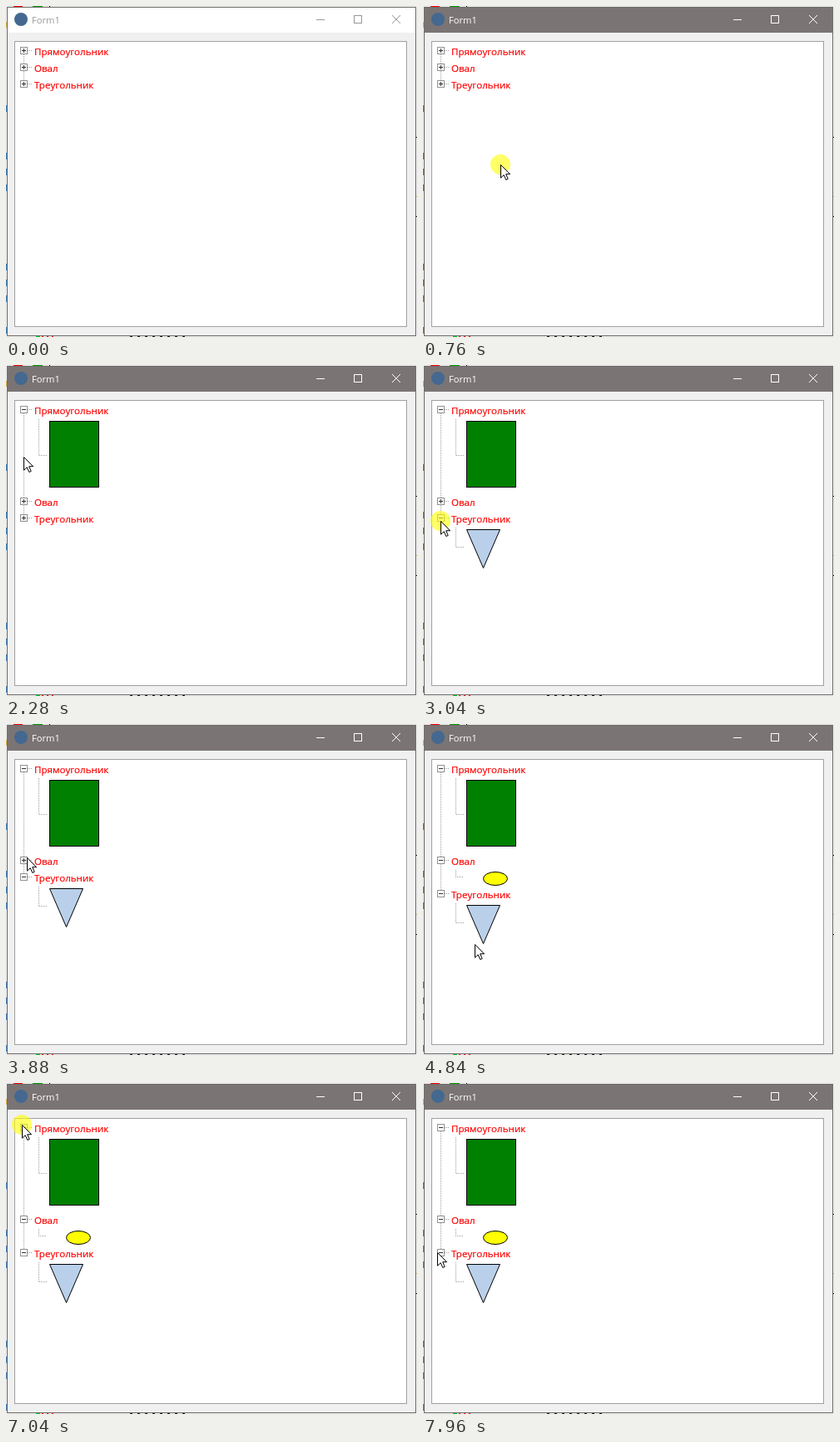
An HTML page for the animation above (8 s loop, 494 by 397 pixels).

```html
<!DOCTYPE html>
<html lang="ru">
<head>
<meta charset="utf-8">
<title>Form1</title>
<style>
  html, body { margin: 0; width: 100%; height: 100%; overflow: hidden; background: #f0f0f0; }
  svg { display: block; width: 494px; height: 397px; }
  text { font: 11.2px "Open Sans", "Noto Sans", sans-serif; }
  .crisp { shape-rendering: crispEdges; }
  .dots { stroke: #a0a0a0; stroke-dasharray: 1 1; fill: none; }
  .label { font-size: 11.6px; fill: #f00; stroke: #f00; stroke-width: .2; }
  .shape { stroke: #000; }
</style>
</head>
<body>
<svg viewBox="0 0 494 397">
  <rect width="494" height="397" fill="#f0f0f0"/>
  <g id="behind" class="crisp">
    <path d="M9 .5h11" stroke="#f00"/>
    <path d="M32 .5h12" stroke="#00a000"/>
    <path d="M52 .5h1M492 157.5h2M492 252.5h2" stroke="#000"/>
    <path d="M.5 19v7M492 228.5h2" stroke="#e0b050"/>
    <path d="M36 396h5" stroke="#00d020" stroke-width="2"/>
    <path d="M43 396.5h17" stroke="#f00" stroke-dasharray="2 4"/>
    <path d="M149 396.5h66" stroke="#222" stroke-dasharray="3 6"/>
  </g>
  <rect class="crisp" x="1" y="1" width="492" height="395" fill="#f0f0f0"/>
  <rect id="bar" class="crisp" x="1" y="1" width="492" height="31"/>
  <rect class="crisp" x="1.5" y="1.5" width="491" height="394" fill="none" stroke="#6e6a69"/>
  <circle cx="18" cy="16" r="8" fill="#44688f"/>
  <text id="caption" x="31" y="21">Form1</text>
  <g id="buttons" fill="none">
    <path class="crisp" d="M373 16.5h10M418.5 11.5h9v9h-9z"/>
    <path d="M464 11l10 10M474 11l-10 10"/>
  </g>
  <rect class="crisp" x="10.5" y="42.5" width="471" height="342" fill="#fff" stroke="#a0a0a0"/>
  <path id="trunk" class="dots crisp"/>
  <g id="tree"></g>
  <g id="pointer">
    <circle id="glow" r="12" fill="#ff0" fill-opacity=".6"/>
    <path d="M.5 .5V16.2L4.2 12.7L6.8 18.5L9.2 17.4L6.7 11.7H11.6Z" fill="#fff" stroke="#000"/>
  </g>
</svg>
<script>
const LOOP = 8000, TICK = 40, PRESS = 80;
const ACTIVATE = 760;
const ROW = 20;
const byId = id => document.getElementById(id);

function set(el, attrs) {
  for (const name in attrs) el.setAttribute(name, attrs[name]);
  return el;
}

function add(parent, tag, attrs, content = "") {
  const el = set(document.createElementNS("http://www.w3.org/2000/svg", tag), attrs);
  el.textContent = content;
  return parent.appendChild(el);
}

// icons of the window behind, one character per 19 px row
[..."#..###....###.#"].forEach((mark, row) => {
  if (mark === "#")
    add(byId("behind"), "rect", { x: 0, y: 119 + 19 * row, width: 2, height: 8, fill: "#3f7fbd" });
});

// toggles: times at which the node is opened, closed, opened...
const nodes = [
  { name: "Прямоугольник", toggles: [1760, 6320, 7040], height: 90,
    shape: ["path", { d: "M52.5 23.5h59v79h-59z", fill: "#008000", class: "shape crisp" }] },
  { name: "Овал", toggles: [4040], height: 20,
    shape: ["ellipse", { cx: 87, cy: 31.5, rx: 14.5, ry: 8, fill: "#ff0", class: "shape" }] },
  { name: "Треугольник", toggles: [3040], height: 50,
    shape: ["path", { d: "M52.5 23.5h40l-20 46z", fill: "#bad0ea", class: "shape" }] },
];

for (const node of nodes) {
  node.group = add(byId("tree"), "g", {});
  add(node.group, "path", { d: "M26 9.5H31", class: "dots crisp" });
  add(node.group, "path", { d: "M17.5 5.5h8v8h-8z", fill: "#fff", stroke: "#919191", class: "crisp" });
  node.sign = add(node.group, "path", { stroke: "#333", class: "crisp" });
  add(node.group, "text", { x: 34, y: 15, class: "label" }, node.name);
  node.child = add(node.group, "g", {});
  add(node.child, "path", { d: `M39.5 21V${node.height / 2 + 19.5}H49`, class: "dots crisp" });
  add(node.child, ...node.shape);
}

const clicks = [ACTIVATE, ...nodes.flatMap(node => node.toggles)];

// the pointer rests between moves
const APPEAR = 480;
const origin = { x: 127, y: 239 };
const moves = [
  { from: APPEAR, to: 600, x: 94, y: 193 },
  { from: 720, to: 1200, x: 24, y: 45 },
  { from: 1360, to: 1560, x: 21, y: 50 },
  { from: 1840, to: 2800, x: 21, y: 187 },
  { from: 3120, to: 3240, x: 17, y: 231 },
  { from: 3360, to: 3880, x: 25, y: 160 },
  { from: 4120, to: 4840, x: 62, y: 264 },
  { from: 4840, to: 5320, x: 26, y: 153 },
  { from: 5440, to: 6120, x: 21, y: 50 },
  { from: 6560, to: 7040, x: 19, y: 50 },
  { from: 7120, to: 7960, x: 17, y: 203 },
];

function ease(time, from, to) {
  const u = Math.min(1, Math.max(0, (time - from) / (to - from)));
  return u * u * (3 - 2 * u);
}

function pointerAt(time) {
  let { x, y } = origin;
  for (const move of moves) {
    const k = ease(time, move.from, move.to);
    x += (move.x - x) * k;
    y += (move.y - y) * k;
  }
  return [Math.round(x), Math.round(y)];
}

const visibility = shown => ({ visibility: shown ? "visible" : "hidden" });

function drawWindow(active) {
  const ink = active ? "#fff" : "#999";
  set(byId("bar"), { fill: active ? "#7a7574" : "#fff" });
  set(byId("caption"), { fill: ink });
  set(byId("buttons"), { stroke: ink });
}

function drawTree(time) {
  let y = 44, last = y;
  for (const node of nodes) {
    const open = node.toggles.filter(t => t <= time).length % 2 === 1;
    set(node.group, { transform: `translate(0 ${y})` });
    set(node.sign, { d: open ? "M19 9.5h5" : "M19 9.5h5M21.5 7v5" });
    set(node.child, visibility(open));
    last = y;
    y += ROW + (open ? node.height : 0);
  }
  set(byId("trunk"), { d: `M21.5 54V${last + 9}` });
}

function drawPointer(time) {
  const shown = time >= APPEAR;
  const pressed = clicks.some(t => time >= t && time < t + PRESS);
  set(byId("pointer"), { transform: `translate(${pointerAt(time)})`, ...visibility(shown) });
  set(byId("glow"), visibility(shown && pressed));
}

function render(now) {
  const time = Math.floor((now % LOOP) / TICK) * TICK;
  drawWindow(time >= ACTIVATE);
  drawTree(time);
  drawPointer(time);
}

const start = performance.now();
function frame() {
  render(performance.now() - start);
  requestAnimationFrame(frame);
}
frame();
</script>
</body>
</html>
```
